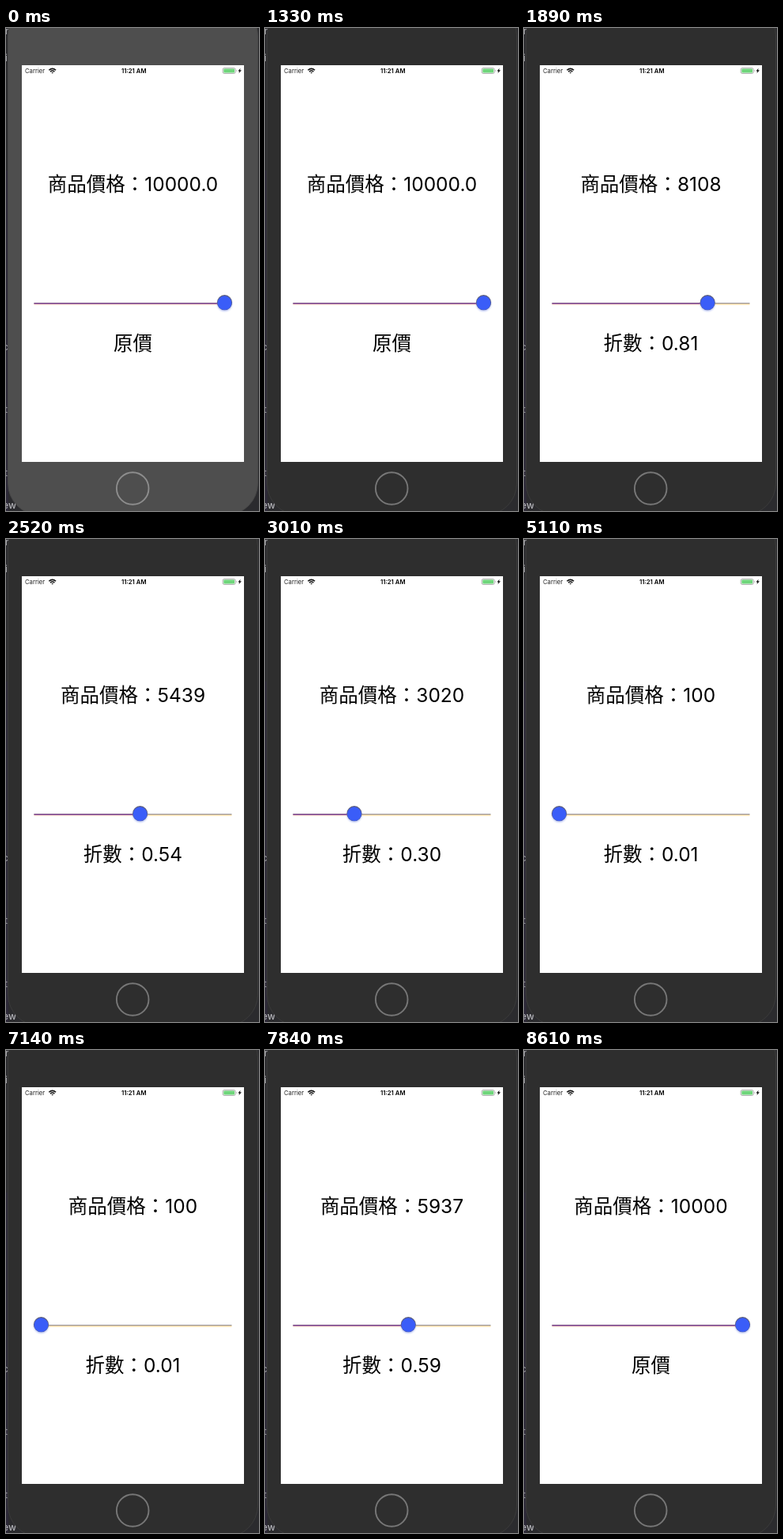
These frames come from a looping animation (320x610 px, 9450 ms). An HTML page:

```html
<!DOCTYPE html>
<html lang="zh-Hant">
<head>
<meta charset="utf-8">
<title>Discount slider</title>
<style>
html, body { margin: 0; width: 100%; height: 100%; overflow: hidden; background: #2b2b2e; }
svg { display: block; width: 320px; height: 610px; }
.label { font: 400 24.5px Inter, sans-serif; text-anchor: middle; }
.cjk { font-family: "Noto Sans CJK TC", "Noto Sans CJK", sans-serif; }
.colon { font-family: "Noto Sans CJK SC", "Noto Sans CJK", sans-serif; }
.status { font: 400 7.7px Inter, sans-serif; fill: #222; }
.behind { font: 12px Inter, sans-serif; fill: #a9a9ae; }
</style>
</head>
<body>
<svg viewBox="0 0 320 610">
  <defs>
    <filter id="blur" x="-50%" y="-50%" width="200%" height="200%">
      <feGaussianBlur stdDeviation="1.3"/>
    </filter>
  </defs>

  <!-- window behind the phone -->
  <rect width="320" height="610" fill="#2b2b2e"/>
  <rect y="180" width="3" height="430" fill="#2d2938"/>
  <g class="behind">
    <text x="-1" y="8">r</text>
    <text x="-4" y="42">ii</text>
    <text x="-5" y="366">l</text>
    <text x="-4" y="407">c</text>
    <text x="-2" y="486">t</text>
    <text x="-2" y="566">t</text>
    <text x="-4" y="607" font-weight="600">ew</text>
  </g>

  <!-- phone -->
  <rect id="body" x="2.5" y="-30" width="316" height="645" rx="40" stroke-width="1"/>
  <rect x="20" y="47" width="281" height="501" fill="#fff"/>
  <circle id="home" cx="160.2" cy="581.5" r="20.3" fill="none" stroke-width="1.9"/>

  <!-- status bar -->
  <text class="status" x="24" y="57">Carrier</text>
  <text class="status" x="161.7" y="57" text-anchor="middle" style="font-weight:600;fill:#000">11:21 AM</text>
  <g fill="none" stroke="#111" stroke-width="1.5">
    <path d="M54.3 53.3Q58.7 49.4 63.1 53.3"/>
    <path d="M56 55.1Q58.7 52.8 61.4 55.1"/>
    <path d="M57.3 55.9H60.1L58.7 57.4Z" fill="#111" stroke="none"/>
  </g>
  <rect x="274.2" y="50.6" width="16" height="6.8" rx="1.8" fill="#fff" stroke="#8a8a8a" stroke-width=".7"/>
  <rect x="275.3" y="51.6" width="13.8" height="4.8" rx="1" fill="#6fd67b"/>
  <path d="M291.2 52.8Q292.3 54 291.2 55.2Z" fill="#8a8a8a"/>
  <path d="M296.6 50.8L293.4 54.5H295.2L294.5 57.3L297.9 53.3H296Z" fill="#111"/>

  <!-- labels -->
  <text class="label" x="160.5" y="206.3"><tspan class="cjk">商品價格</tspan><tspan class="colon">：</tspan><tspan id="price"></tspan></text>
  <text class="label" x="160.5" y="406.8"><tspan id="word" class="cjk"></tspan><tspan id="colon" class="colon"></tspan><tspan id="rate"></tspan></text>

  <!-- slider -->
  <rect x="35.5" y="348" width="250" height="1.7" fill="#ffe3ae"/>
  <rect x="35.5" y="347" width="250" height="1.2" fill="#98949a"/>
  <g id="filled">
    <rect x="35.5" y="348" height="1.2" fill="#d9aede"/>
    <rect x="35.5" y="347" height="1.3" fill="#6d3a79"/>
  </g>
  <g id="thumb">
    <circle cy="348.4" r="9.2" fill="#6f86e8" opacity=".6" filter="url(#blur)"/>
    <circle cy="346.7" r="9.6" fill="#5c5e7c"/>
    <circle cy="347.2" r="8.9" fill="#3a5df8"/>
  </g>
</svg>
<script>
const LOOP = 9450, STEP = 70, FOCUS = 1330;
const MIN = 0.01, LEFT = 44.5, TRAVEL = 232;

// [time, slider value], linear in between
const path = [
  [0, 1], [1330, 1], [1400, .966], [1470, .966],
  [1960, .785], [2030, .785], [2520, .54395], [3010, .302],
  [3570, .16755], [3710, .1582], [4060, .1582], [4270, .1512],
  [4480, .1512], [4830, .0546], [4900, .0546], [5110, .01],
  [7140, .01], [7210, .0442], [7280, .0442], [7490, .15],
  [8050, .86], [8260, .983], [8330, .994], [8400, 1], [LOOP, 1]
];

const $ = id => document.getElementById(id);
const set = (el, attrs) => {
  for (const key in attrs) el.setAttribute(key, attrs[key]);
};
const write = (id, text) => {
  if ($(id).textContent !== text) $(id).textContent = text;
};

function valueAt(t) {
  const i = path.findIndex(p => p[0] > t);
  const [t0, v0] = path[i - 1], [t1, v1] = path[i];
  return v0 + (v1 - v0) * (t - t0) / (t1 - t0);
}

function draw(time) {
  const t = Math.floor(time % LOOP / STEP) * STEP;
  const value = valueAt(t);
  const full = value > .9999;
  const x = LEFT + TRAVEL * (value - MIN) / (1 - MIN);
  const lit = t < FOCUS;

  set($("body"), { fill: lit ? "#4e4e4e" : "#2e2e2e", stroke: lit ? "#474747" : "#3b3b3b" });
  set($("home"), { stroke: lit ? "#8d8d8d" : "#777" });

  write("price", t <= FOCUS ? "10000.0" : String(Math.floor(value * 10000 + 1e-6)));
  write("word", full ? "原價" : "折數");
  write("colon", full ? "" : "：");
  write("rate", full ? "" : value.toFixed(2));

  for (const bar of $("filled").children) set(bar, { width: x - 35.5 });
  set($("thumb"), { transform: `translate(${x} 0)` });
}

const start = performance.now();
function tick() {
  draw(performance.now() - start);
  requestAnimationFrame(tick);
}
tick();
</script>
</body>
</html>
```
